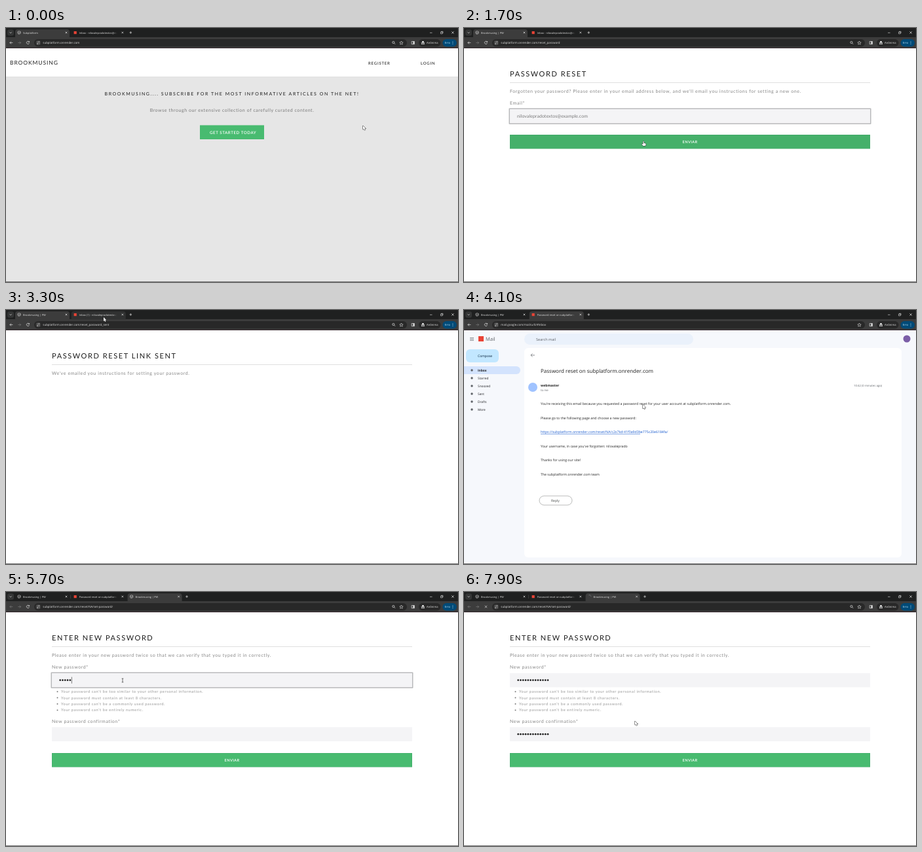
Animation, 690 px wide and 388 px high, one loop 8 s. Source, as an HTML page with a canvas:

```html
<!DOCTYPE html>
<html lang="en">
<head>
<meta charset="utf-8">
<title>Password reset walkthrough</title>
<style>
  html, body { margin: 0; width: 100%; height: 100%; overflow: hidden; background: #fff; }
  canvas { display: block; }
</style>
</head>
<body>
<canvas id="stage" width="690" height="388"></canvas>
<script>
const ctx = document.getElementById('stage').getContext('2d');
const LOOP = 8000, STEP = 100;
const BRAND = 'Brookmusing', EMAIL = 'nilovalepradotextos@example.com';
const SITE = 'subplatform.onrender.com';
const GREEN = '#48bb70', GREY = '#858585', BAR = '#3c3c3c', STRIP = '#1f2020', PILL = '#282828', LIGHT = '#e3e3e3';

// Cursor path: time, x, y, and the shape used from that time on
const PATH = [
  [0, 545, 149, 'arrow'], [200, 642, 52, 'hand'], [300, 642, 52, 'arrow'], [500, 599, 68, 'arrow'],
  [900, 335, 275, 'hand'], [1100, 335, 275, 'arrow'], [1300, 250, 138, 'beam'], [1600, 274, 173, 'hand'],
  [2200, 274, 173, 'arrow'], [2500, 274, 173, 'arrow'], [3300, 149, 11, 'arrow'], [3400, 149, 11, 'arrow'],
  [3600, 250, 103, 'hand'], [3700, 250, 103, 'arrow'], [4000, 250, 103, 'arrow'], [4200, 296, 186, 'hand'],
  [4300, 296, 186, 'arrow'], [4900, 296, 186, 'arrow'], [5200, 178, 135, 'beam'], [6200, 178, 135, 'beam'],
  [6400, 230, 217, 'beam'], [7000, 230, 217, 'arrow'], [7300, 290, 256, 'hand'], [7500, 290, 256, 'arrow'],
  [7900, 261, 197, 'arrow']
];
const PAGES = [[0, home], [400, login], [1200, reset], [2200, sent], [3400, inbox], [3700, message], [4300, blank], [4700, newPassword]];
const LOADING = [[300, 400], [1100, 1200], [1900, 2200], [4300, 4700], [7500, 8000]];
const HOVERED = [[200, 400, '/login/'], [900, 1200, '/reset_password'], [4200, 4300, '/reset/NA/c2x7kd-41f0a9']];

const clamp = (v, lo = 0, hi = 1) => Math.min(hi, Math.max(lo, v));
const within = (t, [a, b]) => t >= a && t < b;
const lastBefore = (list, t) => list.filter(item => item[0] <= t).pop();

function rect(x, y, w, h, color, radius = 0) {
  ctx.fillStyle = color;
  ctx.beginPath();
  ctx.roundRect(x, y, w, h, radius);
  ctx.fill();
}
function disc(x, y, r, color) {
  ctx.fillStyle = color;
  ctx.beginPath();
  ctx.arc(x, y, r, 0, 7);
  ctx.fill();
}
function stroke(d, color, width = 0.7) {
  ctx.strokeStyle = color;
  ctx.lineWidth = width;
  ctx.stroke(new Path2D(d));
}
function text(str, x, y, size, color, { gap = 0, weight = 400, align = 'left', font = 'Lato' } = {}) {
  ctx.font = `${weight} ${size}px "${font}", sans-serif`;
  ctx.letterSpacing = gap + 'px';
  ctx.textRendering = 'geometricPrecision';
  ctx.textAlign = align;
  ctx.fillStyle = color;
  ctx.fillText(str, x, y);
  return ctx.measureText(str).width;
}
const ui = (str, x, y, color = LIGHT, size = 4.45, weight = 400) => text(str, x, y, size, color, { font: 'Open Sans', weight });
const body = (str, x, y, color = GREY) => text(str, x, y, 7, color, { gap: 0.59 });
const cross = (x, y, r, color) => stroke(`M${x - r} ${y - r}l${2 * r} ${2 * r}m0 ${-2 * r}l${-2 * r} ${2 * r}`, color);

// Web pages
function heading(str, baseline, rule, size = 11) {
  text(str, 70, baseline, size, '#1c1c1c', { gap: 1.58 });
  rect(70, rule, 550, 0.8, '#d4d4d4');
}
function field(y, focused) {
  if (focused) rect(68.5, y - 1.5, 553, 24.5, '#b9babc', 1);
  rect(70, y, 550, 21.5, '#f4f4f6');
}
function button(label, y, color = GREEN) {
  rect(70, y, 550, 21.5, '#3da566');
  rect(70.5, y + 0.5, 549, 20.5, color);
  text(label, 345, y + 12.7, 5.7, '#fff', { gap: 0.35, weight: 600, align: 'center' });
}
const caret = (x, y) => rect(x, y - 5, 0.7, 10, '#444');
function dots(count, y) {
  for (let i = 0; i < count; i++) disc(82.7 + i * 3.78, y, 1.35, '#222');
}
function underlined(str, y) {
  const width = text(str, 345, y, 7, '#4a4a4a', { gap: 0.58, align: 'center' });
  rect(345 - width / 2, y + 1.2, width, 0.6, '#4a4a4a');
}

function home() {
  rect(0, 75, 690, 313, '#e6e6e6');
  rect(0, 74.5, 690, 0.7, '#d2d2d2');
  text(BRAND.toUpperCase(), 6, 56, 8.5, '#222', { gap: 0.9 });
  text('REGISTER', 553, 55.5, 6, '#222', { gap: 0.8, weight: 500 });
  text('LOGIN', 633, 55.5, 6, '#222', { gap: 0.8, weight: 500 });
  text(BRAND.toUpperCase() + '.... SUBSCRIBE FOR THE MOST INFORMATIVE ARTICLES ON THE NET!', 345, 103, 7, '#1c1c1c', { gap: 1.58, align: 'center' });
  text('Browse through our extensive collection of carefully curated content.', 345, 127.5, 7, '#777', { gap: 0.57, align: 'center' });
  rect(296, 148.5, 98, 21.5, GREEN);
  text('GET STARTED TODAY', 311, 161.5, 6.2, '#fff', { gap: 0.55, weight: 600 });
}
function login() {
  heading('LOGIN', 77, 87.6, 14);
  body('Proceed to login to your account.', 70, 103, '#999');
  body('Email address*', 70, 131.7);
  field(139, true);
  caret(81, 149.7);
  body('Password*', 70, 175);
  field(182);
  button('LOGIN', 221.3);
  underlined("Don't have an account?", 257.6);
  underlined('Forgotten your password?', 279.2);
}
function reset(t) {
  heading('PASSWORD RESET', 73.5, 83);
  body("Forgotten your password? Please enter in your email address below, and we'll email you instructions for setting a new one.", 70, 99);
  body('Email*', 70, 116.7);
  field(124, true);
  const typed = EMAIL.slice(0, Math.round(EMAIL.length * clamp((t - 1200) / 300)));
  text(typed, 81, 136.6, 6.9, '#777', { gap: 0.1 });
  if (!typed) caret(81, 134.5);
  button('ENVIAR', 163, t >= 1600 ? '#45b06a' : GREEN);
}
function sent() {
  heading('PASSWORD RESET LINK SENT', 73.5, 83);
  body("We've emailed you instructions for setting your password.", 70, 99);
}
function newPassword(t) {
  const focus = t < 5300 || t >= 7500 ? 0 : t < 6400 ? 1 : 2;
  const first = Math.round(clamp((t - 5450) / 55, 0, t < 6200 ? 10 : 13));
  const second = Math.round(clamp((t - 6400) / 35, 0, 13));
  heading('ENTER NEW PASSWORD', 73.5, 83);
  body('Please enter in your new password twice so that we can verify that you typed it in correctly.', 70, 99);
  body('New password*', 70, 116.7);
  field(124, focus === 1);
  dots(first, 134.7);
  if (focus === 1) caret(81 + first * 3.78, 134.7);
  ["can't be too similar to your other personal information.", 'must contain at least 8 characters.',
    "can't be a commonly used password.", "can't be entirely numeric."].forEach((rule, i) => {
    disc(78.5, 152.2 + i * 9.4, 1, '#777');
    text('Your password ' + rule, 84, 154.2 + i * 9.4, 5.8, '#969696', { gap: 0.58 });
  });
  body('New password confirmation*', 70, 199.6);
  field(206.5, focus === 2);
  dots(second, 217.2);
  if (focus === 2) caret(81 + second * 3.78, 217.2);
  button('ENVIAR', 246, within(t, [7300, 7700]) ? '#45b06a' : GREEN);
}
function blank() {
  rect(0, 30, 690, 358, '#3b3b3b');
}

// Mail client
function mailFrame() {
  rect(0, 31, 690, 357, '#f6f8fc');
  for (let i = 0; i < 3; i++) rect(9, 42 + i * 2, 6, 0.7, '#5f6368');
  rect(22, 40, 8, 8, '#ea4335');
  ui('Mail', 33, 47, '#5f6368', 7.5);
  rect(92, 36, 258, 17, '#eaf1fb', 8.5);
  ui('Search mail', 110, 46.5, '#5f6368', 5.6);
  disc(676, 44, 5.5, '#7b5ea7');
  rect(3, 60, 50, 20, '#c2e7ff', 6);
  ui('Compose', 21, 72, '#001d35', 5);
  rect(0, 86, 86, 12, '#d3e3fd', [0, 6, 6, 0]);
  ['Inbox', 'Starred', 'Snoozed', 'Sent', 'Drafts', 'More'].forEach((name, i) => {
    disc(12, 92 + i * 12, 1.7, '#5f6368');
    ui(name, 21, 93.8 + i * 12, '#202124', 4.8, i ? 400 : 700);
  });
  rect(92, 58, 576, 320, '#fff', 6);
}
function inbox() {
  mailFrame();
  ['Primary', 'Promotions', 'Social'].forEach((name, i) => ui(name, 115 + i * 91, 87, i ? '#5f6368' : '#0b57d0', 4.8));
  rect(100, 95, 90, 1, '#0b57d0');
  [['webmaster', `Password reset on ${SITE} - You're receiving this email because you requested a password reset`, '10:42'],
    ['Study group', 'Notes for the next lesson - The reading list is ready', '09:15'],
    ['Newsletter', 'Weekly summary - Five short articles for you', '22 Jan'],
    ['Course desk', 'Your schedule - New dates are available', '20 Jan']].forEach(([from, subject, when], i) => {
    const y = 97 + i * 14.4, weight = i ? 400 : 700, ink = i ? '#5f6368' : '#202124';
    rect(92, y, 576, 14, i ? '#f2f6fc' : '#fff');
    rect(98, y + 5, 4.5, 4.5, '#c4c7c5', 1);
    ui(from, 120, y + 9, ink, 4.8, weight);
    ui(subject, 182, y + 9, ink, 4.8, weight);
    ui(when, 642, y + 9, ink, 4.3, weight);
  });
}
function message() {
  mailFrame();
  stroke('M108 69h-6m2.5 -2.5l-2.5 2.5l2.5 2.5', '#5f6368');
  ui(`Password reset on ${SITE}`, 117, 96, '#1f1f1f', 8);
  disc(105, 118, 7, '#a0c3ff');
  ui('webmaster', 117, 117, '#1f1f1f', 5, 700);
  ui('to me', 117, 124, '#5f6368', 4.3);
  ui('10:42 (0 minutes ago)', 595, 117, '#5f6368', 4.3);
  ["You're receiving this email because you requested a password reset for your user account at " + SITE + '.',
    'Please go to the following page and choose a new password:',
    `https://${SITE}/reset/NA/c2x7kd-41f0a9d3be775c20e6184fa/`,
    "Your username, in case you've forgotten: nilovaleprado", 'Thanks for using our site!', `The ${SITE} team`]
    .forEach((line, i) => ui(line, 117, 145 + i * 21.5, i === 2 ? '#15c' : '#222', 5.2));
  rect(117, 189.3, 152, 0.5, '#15c');
  rect(117, 284, 40, 14, '#fff', 7);
  stroke('M122 284h36a7 7 0 0 1 0 14h-36a7 7 0 0 1 0 -14z', '#747775', 0.5);
  ui('Reply', 133, 292.5, '#444746', 5);
}

// Browser window
function globe(x, color = '#cfcfcf') {
  stroke(`M${x - 2.3} 7a2.3 2.3 0 1 0 4.6 0a2.3 2.3 0 1 0 -4.6 0m.4 -1l2 1.2l-.6 2m2.6 -3.8l-1.2 1.2l1.4 1`, color, 0.6);
}
function spinner(x, t) {
  const start = t / 130;
  ctx.strokeStyle = '#8f9499';
  ctx.lineWidth = 0.6;
  ctx.beginPath();
  ctx.arc(x, 7, 2.3, start, start + 2);
  ctx.stroke();
}
function tab(index, title, fill, loading, t) {
  const x = 14 + index * 85.8;
  if (fill) {
    rect(x, 2, 83, 12.5, fill, [4, 4, 0, 0]);
  }
  if (loading) spinner(x + 6, t);
  else if (index === 1) rect(x + 3.8, 5, 4.2, 4.2, '#ea4335');
  else globe(x + 6);
  const fade = ctx.createLinearGradient(x + 64, 0, x + 72, 0);
  fade.addColorStop(0, LIGHT);
  fade.addColorStop(1, 'transparent');
  ctx.save();
  ctx.beginPath();
  ctx.rect(x, 0, 72, 14);
  ctx.clip();
  ui(title, x + 12, 8.7, fade, 3.95);
  ctx.restore();
  cross(x + 78, 7, 1.3, LIGHT);
}
function browser(t, page) {
  const loading = LOADING.some(span => within(t, span));
  const third = t >= 4300, mail = page === inbox || page === message;
  const active = third ? 2 : mail ? 1 : 0;
  const mailTitle = t >= 3700 ? `Password reset on ${SITE}` : `Inbox ${t >= 2700 ? '(1) ' : ''}- ${EMAIL}`;
  const fill = i => i === active ? BAR : i === 1 && within(t, [3200, 3400]) ? '#303131' : null;
  const pageTitle = `${BRAND} | PW`;

  rect(0, 0, 690, 14, STRIP);
  rect(0, 14, 690, 16, BAR);
  if (page !== blank) rect(0, 30, 690, 1, '#33262b');
  rect(2, 2.2, 10, 9.6, '#353636', 3);
  stroke('M5.6 6.4l1.5 1.5l1.5 -1.5', LIGHT);
  tab(0, page === home ? 'Subplatform' : page === login ? 'Login' : pageTitle, fill(0), loading && active === 0, t);
  tab(1, mailTitle, fill(1), false, t);
  if (third) {
    tab(2, page === blank ? 'Carregando...' : pageTitle, fill(2), loading, t);
    rect(98.5, 4.5, 0.5, 5.5, '#555');
  }
  const plus = third ? 276 : 190.3;
  stroke(`M${plus - 1.8} 7h3.6m-1.8 -1.8v3.6`, LIGHT);
  stroke('M647 7.3h3.6M663.5 6.2h2.6v2.6h-2.6zM664.4 6v-.7h2.6v2.6h-.7', LIGHT, 0.6);
  cross(682, 7, 1.7, LIGHT);

  stroke('M10.3 22.5h-4.4m2 -2l-2 2l2 2', third ? '#787878' : LIGHT);
  stroke('M18.3 22.5h4.4m-2 -2l2 2l-2 2', '#787878');
  if (loading) cross(33.5, 22.5, 1.7, LIGHT);
  else stroke('M35.3 21.3a2.1 2.1 0 1 0 .2 1.8m.1 -3.1v1.7h-1.7', LIGHT);

  rect(43, 17, 569, 11.4, PILL, 5.7);
  disc(49.3, 22.6, 4, BAR);
  if (page === blank) stroke('M47 22.6a2.3 2.3 0 1 0 4.6 0a2.3 2.3 0 1 0 -4.6 0m2.3 -.3v1.5m0 -2.6v.6', LIGHT, 0.6);
  else stroke('M47 21.3h1.6m1 0a.8 .8 0 1 0 1.6 0a.8 .8 0 1 0 -1.6 0M51.6 24h-1.6m-1 0a.8 .8 0 1 0 -1.6 0a.8 .8 0 1 0 1.6 0', LIGHT, 0.6);
  const paths = new Map([[home, ''], [login, '/login/'], [reset, '/reset_password'], [sent, '/reset_password_sent'], [newPassword, '/reset/NA/set-password/']]);
  ui(page === blank ? 'about:blank' : mail ? 'mail.google.com/mail/u/0/#inbox' : SITE + paths.get(page), 56.3, 24.2);
  if (paths.has(page)) stroke('M589.8 22a1.6 1.6 0 1 0 3.2 0a1.6 1.6 0 1 0 -3.2 0m2.8 1.2l1.6 1.6', LIGHT);
  stroke('M603.5 20l.8 1.8l1.9 .2l-1.4 1.3l.4 1.9l-1.7 -1l-1.7 1l.4 -1.9l-1.4 -1.3l1.9 -.2z', LIGHT, 0.6);
  stroke('M619.2 20.5h4.2v4.2h-4.2z', LIGHT);
  rect(621.4, 20.5, 2, 4.2, LIGHT);
  rect(630, 17, 33.5, 11.4, PILL, 5.7);
  rect(635, 20, 3, 2, LIGHT, 0.7);
  rect(633.8, 22, 5.4, 0.7, LIGHT);
  disc(635.2, 24.2, 1, LIGHT);
  disc(637.8, 24.2, 1, LIGHT);
  ui('Anônima', 642, 24.1, LIGHT, 4.2);
  rect(666.5, 17, 21.5, 11.4, '#004a77', 5.7);
  ui('Erro', 669.8, 24.1, '#c2e7ff', 4.2);
  for (let i = 0; i < 3; i++) disc(682, 20.8 + i * 1.8, 0.5, '#c2e7ff');
}
function footer(t, page) {
  rect(0, 387, 690, 1, page === blank ? '#4c4c4c' : '#777');
  if (page === blank) rect(0, 387, 105, 1, '#a5a5a5');
  const hover = HOVERED.find(span => within(t, span));
  if (!hover) return;
  rect(0, 380, 105, 8, BAR, [0, 2, 0, 0]);
  ui(`https://${SITE}${hover[2]}`, 2.5, 385.7, LIGHT, 4);
}

function cursor(t) {
  const from = lastBefore(PATH, t), to = PATH[PATH.indexOf(from) + 1] || from;
  const p = to === from ? 0 : (t - from[0]) / (to[0] - from[0]);
  const ease = p * p * (3 - 2 * p);
  const shapes = {
    arrow: 'M0 0v6.2l1.4 -1.3l1 2.2l1 -.5l-1 -2.1h2z',
    hand: 'M-.6 .2q.6 -.8 1.2 0v2.6l2.6 .6q.6 .2 .5 .9l-.6 2.7h-3.7l-2 -2.6q.1 -.9 .9 -.5l1.1 .8z'
  };
  ctx.save();
  ctx.translate(from[1] + (to[1] - from[1]) * ease, from[2] + (to[2] - from[2]) * ease);
  if (from[3] === 'beam') {
    stroke('M-1.3 -2.8h2.6M0 -2.8v5.6M-1.3 2.8h2.6', '#333', 0.7);
  } else {
    const d = shapes[from[3]];
    stroke(d, '#222', 1);
    ctx.fillStyle = '#fff';
    ctx.fill(new Path2D(d));
  }
  ctx.restore();
}

function draw(t) {
  const page = lastBefore(PAGES, t)[1];
  rect(0, 0, 690, 388, '#fff');
  page(t);
  browser(t, page);
  footer(t, page);
  cursor(t);
}

const start = performance.now();
function tick() {
  const t = (performance.now() - start) % LOOP;
  draw(Math.floor(t / STEP) * STEP);
  requestAnimationFrame(tick);
}
tick();
</script>
</body>
</html>
```
